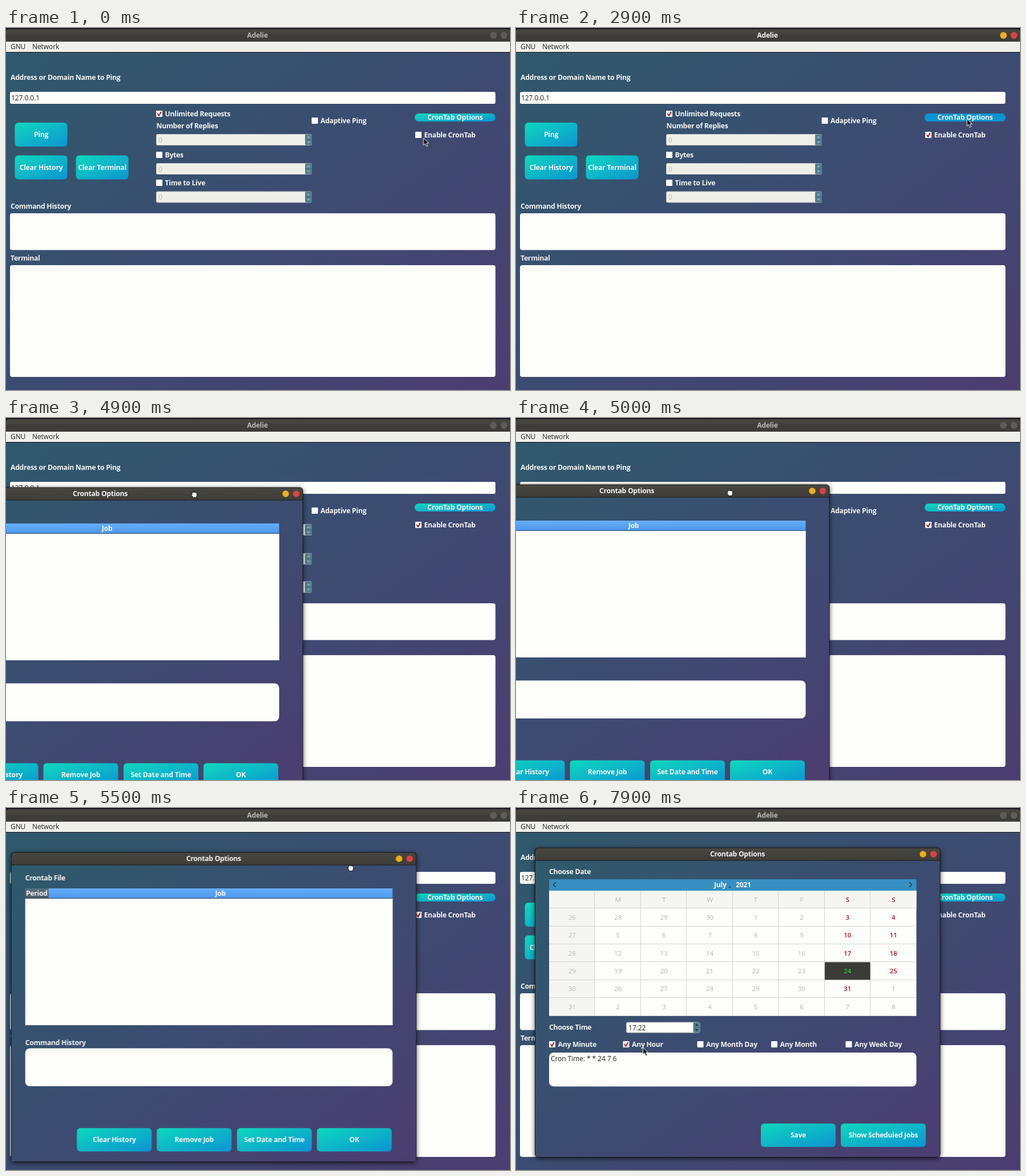
Write an HTML page that moves like this. It is 883x635 px and loops after 8 s.

```html
<!DOCTYPE html>
<html lang="en">
<head>
<meta charset="utf-8">
<title>Ping window</title>
<style>
  html, body { margin: 0; width: 100%; height: 100%; overflow: hidden; background: #3c4b70; }
  svg { display: block; width: 883px; height: 635px; }
  text { font: 700 12.2px "Open Sans", "Noto Sans", sans-serif; letter-spacing: -.27px; fill: #f3f4f2; white-space: pre; }
  .mid { text-anchor: middle; }
  .plain { font-weight: 400; font-size: 12px; letter-spacing: -.08px; fill: #222; }
  .off { fill: #bdbdb8; }
  .day { font-weight: 400; font-size: 11.5px; letter-spacing: 0; fill: #b5b5b1; }
  .weekend { font-weight: 600; fill: #b3142c; }
  .today { font-weight: 600; fill: #2fc044; }
  .idle { fill: #bab7b0; }
  .paper { fill: #fefefb; }
  .shadow { filter: drop-shadow(0 2px 4px #000a); }
</style>
</head>
<body>
<svg viewBox="0 0 883 635" id="stage"></svg>
<script>
const LOOP = 8000, STEP = 100;

// Drawing helpers
const text = (x, y, s, cls = '') => `<text x="${x}" y="${y}" class="${cls}">${s}</text>`;
const rect = (x, y, w, h, fill, r = 0, extra = '') =>
  `<rect x="${x}" y="${y}" width="${w}" height="${h}" rx="${r}" fill="${fill}" ${extra}/>`;
const paper = (x, y, w, h, r) => rect(x, y, w, h, '#fefefb', r);
const line = (d, color, width = 1) => `<path d="${d}" fill="none" stroke="${color}" stroke-width="${width}"/>`;
const dot = (x, y, r, fill) => `<circle cx="${x}" cy="${y}" r="${r}" fill="${fill}"/>`;
const group = (id, ...parts) => `<g id="${id}">${parts.join('')}</g>`;

const gradient = (id, x2, y2, ...colors) =>
  `<linearGradient id="${id}" x1="0" y1="0" x2="${x2}" y2="${y2}">${colors.map((c, i) =>
    `<stop offset="${i / (colors.length - 1)}" stop-color="${c}"/>`).join('')}</linearGradient>`;

const button = (x, y, w, h, label, overlay = '', r = 6) =>
  rect(x, y, w, h, 'url(#cool)', r) + overlay + text(x + w / 2, y + h / 2 + 4.3, label, 'mid');

const tick = (x, y) => line(`M${x + 2.4} ${y + 5}l2.6 3.8l3.8 -7`, '#b8101a', 1.8);
const check = (x, y, label, mark = '') =>
  paper(x, y, 11, 11, 1) + mark + text(x + 15.5, y + 10, label);

function spin(x, y, w, h, value, enabled) {
  const cx = x + w - 6, cy = y + h / 2, ink = enabled ? '#24323a' : '#8fadb6';
  return rect(x + .5, y + .5, w - 1, h - 1, enabled ? '#fefefb' : '#efefea', 2, 'stroke="#c9cac5"') +
    rect(x + w - 12, y + .5, 12, h - 1, '#557f90', 2) +
    line(`M${x + w - 12} ${cy}h12`, '#426878') +
    `<path d="M${cx - 3} ${cy - 3}l3 -3.5l3 3.5zM${cx - 3} ${cy + 3}l3 3.5l3 -3.5z" fill="${ink}"/>` +
    text(x + 4, cy + 4.8, value, enabled ? 'plain' : 'plain off');
}

function calendar() {
  const left = 58, top = 145, cw = 80.44, rh = 31.36;
  const cell = (col, row, s, cls) =>
    text(left + (col + .5) * cw, top + (row + .5) * rh + 4, s, 'mid day ' + cls);
  let out = rect(left, 125, 643.5, 20, '#388fc1') + paper(left, top, 643.5, 219.5) +
    rect(left, top, 643.5, rh, '#f5f5f2') + rect(left, top, cw, 219.5, '#f5f5f2') +
    rect(left + 6 * cw, top + 4 * rh, cw, rh, '#3c3b37');
  let grid = '';
  for (let i = 1; i < 8; i++) {
    grid += `M${left} ${Math.round(top + i * rh) - .5}h643.5M${Math.round(left + i * cw) - .5} ${top}v219.5`;
  }
  out += line(grid, '#d4d4d0') + rect(left + 6 * cw + .5, top + 4 * rh + .5, cw - 1, rh - 1, '#3c3b37');
  [...'MTWTFSS'].forEach((d, i) => out += cell(i + 1, 0, d, i > 4 ? 'weekend' : ''));
  for (let row = 1; row < 7; row++) {
    out += cell(0, row, 25 + row, '');
    for (let col = 1; col < 8; col++) {
      const date = new Date(2021, 5, 20 + row * 7 + col), day = date.getDate();
      const july = date.getMonth() === 6;
      out += cell(col, row, day, july && day === 24 ? 'today' : july && col > 5 ? 'weekend' : '');
    }
  }
  return out + text(347, 139, 'July') + text(385, 139, '2021') +
    '<path d="M372.500 138h4l-2 2.500z" fill="#1d3c50"/>' +
    line('M70 130l-4.500 4.500l4.500 4.500M689 130l4.500 4.500l-4.500 4.500', '#24404f', 1.6);
}

const defs = `<defs>
  ${gradient('sky', 1, 1, '#2f5a6c', '#3c4c71', '#4c3d70')}
  ${gradient('cool', 1, 1, '#0fd8be', '#0c94d2')}
  ${gradient('coolHover', 1, 1, '#0c94d2', '#0fd8be')}
  ${gradient('bar', 0, 1, '#484740', '#3b3a36')}
  ${gradient('job', 0, 1, '#66aefa', '#4f98ea')}
  ${gradient('period', 0, 1, '#5c6f7b', '#4a5a66')}
</defs>`;

const mainWindow =
  rect(0, 0, 883, 635, 'url(#sky)') + rect(0, 0, 883, 4, '#191420') +
  rect(0, 2, 883, 22, 'url(#bar)', 5) + rect(0, 12, 883, 12, '#3d3c38') +
  group('idle', text(440.5, 17, 'Adelie', 'mid idle'), dot(854, 13, 6, '#5e5c58'), dot(872.5, 13, 6, '#5e5c58')) +
  group('active', text(440.5, 17, 'Adelie', 'mid'), dot(854, 13, 6, '#ecae1c'), dot(872.5, 13, 6, '#dc4144')) +
  rect(0, 24, 883, 18, '#f0f0eb') + rect(0, 42, 883, 1, '#17181c') +
  text(8, 37, 'GNU', 'plain') + text(46, 37, 'Network', 'plain') +
  text(8, 91, 'Address or Domain Name to Ping') +
  paper(7, 112, 850.5, 21, 3) + text(9, 127, '127.0.0.1', 'plain') +
  button(15.5, 166, 92, 42, 'Ping') +
  button(15.5, 223.5, 92, 42, 'Clear History') +
  button(122.5, 223.5, 92, 42, 'Clear Terminal') +
  check(263, 145, 'Unlimited Requests', tick(263, 145)) +
  text(263.5, 176, 'Number of Replies') + spin(263, 186, 273, 20, '0') +
  check(263, 217, 'Bytes') + spin(263, 237, 273, 20, '0') +
  check(263, 266, 'Time to Live') + spin(263, 286.5, 273, 20, '0') +
  check(535.5, 157, 'Adaptive Ping') +
  button(716, 150, 141.5, 14, 'CronTab Options',
    rect(716, 150, 141.5, 14, 'url(#coolHover)', 7, 'id="cronHover"') +
    rect(716, 150, 141.5, 14, '#0c94d0', 7, 'id="cronPress"'), 7) +
  check(717, 182, 'Enable CronTab', group('cronTick', tick(717, 182))) +
  text(8, 317, 'Command History') + paper(7, 325, 850.5, 64.5, 4) +
  text(8, 408, 'Terminal') + paper(7, 416, 850.5, 196, 4);

const jobsPage =
  group('jobs',
    group('jobsHead', text(58, 119, 'Crontab File'),
      rect(58, 133, 41, 17, 'url(#period)'), rect(99, 133, 602.5, 17, 'url(#job)'),
      text(78, 146, 'Period', 'mid'), text(400, 146, 'Job', 'mid')),
    paper(58, 150.5, 643.5, 222.5),
    line('M58 150.500h643.500', '#30455f'), line('M58 365.500h604', '#2e3358', 1.5),
    group('jobsBody', paper(58, 151, 643.5, 222)),
    text(58, 408, 'Command History'), paper(58, 413.5, 643.5, 66.5, 8),
    button(148.5, 553.5, 131, 41, 'Clear History'),
    button(288.5, 553.5, 131, 41, 'Remove Job'),
    button(429, 553.5, 131, 41, 'Set Date and Time',
      rect(429, 553.5, 131, 41, 'url(#coolHover)', 6, 'id="dateHover"')),
    button(569, 553.5, 131, 41, 'OK'));

const schedulePage =
  group('calendar', text(58, 116, 'Choose Date'), calendar()) +
  group('schedule',
    text(58, 389, 'Choose Time'), spin(193, 375.5, 129.5, 19, '17:22', true),
    check(58, 409, 'Any Minute', group('minuteTick', tick(58, 409))),
    check(187.5, 409, 'Any Hour', group('hourTick', tick(187.5, 409))),
    check(317.5, 409, 'Any Month Day'), check(447, 409, 'Any Month'), check(577.5, 409, 'Any Week Day'),
    paper(58, 429, 643.5, 59.5, 8),
    group('cronFixed', text(61, 444, 'Cron Time: 22 17 24 7 6', 'plain')),
    group('cronMinute', text(61, 444, 'Cron Time: * 17 24 7 6', 'plain')),
    group('cronBoth', text(61, 444, 'Cron Time: * * 24 7 6', 'plain')),
    button(429, 553.5, 131, 41, 'Save'),
    button(569, 553.5, 149, 41, 'Show Scheduled Jobs'));

const dialog = group('dialog',
  rect(33, 69.5, 710.5, 543.5, '#17181c', 6, 'class="shadow"'),
  rect(34, 70.5, 708.5, 28, 'url(#bar)', 5), rect(34, 92, 708.5, 520, 'url(#sky)'),
  rect(34, 91.5, 708.5, 1, '#17181c'),
  text(388, 85, 'Crontab Options', 'mid'),
  dot(713, 81, 5.8, '#ecae1c'), dot(731.5, 81, 5.8, '#dc4144'),
  jobsPage, schedulePage);

const cursor = group('cursor',
  `<path id="arrow" d="M0 0v12.500l2.900 -2.700l2.200 5l2.300 -1l-2.200 -4.800h4z" fill="#111" stroke="#f4f4f4"/>`,
  `<path id="fist" d="M-4.500 -2q0 -2.500 2 -2.500q1 -1 2.200 0q1.200 -1 2.400 0.300q2.400 -.5 2.400 2v3.200l-1.500 3.500h-5l-3.500 -4.500q0 -2 1.800 -.8z" fill="#fff" stroke="#111"/>`);

document.getElementById('stage').innerHTML = defs + mainWindow + dialog + cursor;

// Timeline helpers, all times in ms
function play(id, frames) {
  frames.push({ ...frames.at(-1), at: LOOP });
  document.getElementById(id).animate(
    frames.map(({ at, easing = 'step-end', ...style }) => ({ offset: at / LOOP, easing, ...style })),
    { duration: LOOP, iterations: Infinity });
}

function show(id, ...spans) {
  const frames = spans[0][0] > 0 ? [{ at: 0, opacity: 0 }] : [];
  for (const [from, to] of spans) {
    frames.push({ at: from, opacity: 1 });
    if (to < LOOP) frames.push({ at: to, opacity: 0 });
  }
  play(id, frames);
}

// Moves in jumps of STEP between the points; a point marked 'hold' rests until the next one.
function move(id, points) {
  play(id, points.map(([at, x, y, hold], i) => {
    const next = points[i + 1];
    const easing = hold || !next ? 'step-end' : `steps(${(next[0] - at) / STEP}, end)`;
    return { at, easing, transform: `translate(${x}px, ${y}px)` };
  }));
}

show('idle', [0, 400], [4700, LOOP]);
show('active', [400, 4700]);
show('cronTick', [500, LOOP]);
show('cronHover', [1000, 3400]);
show('cronPress', [2900, 3000]);
show('dialog', [4900, LOOP]);
show('dateHover', [6400, 6700]);
show('jobsHead', [0, 6600]);
show('jobsBody', [0, 6600]);
show('jobs', [0, 6700]);
show('calendar', [6600, LOOP]);
show('schedule', [6700, LOOP]);
show('minuteTick', [7000, LOOP]);
show('hourTick', [7200, LOOP]);
show('cronFixed', [6700, 7000]);
show('cronMinute', [7000, 7200]);
show('cronBoth', [7200, LOOP]);
show('arrow', [0, 4000], [5900, LOOP]);
show('fist', [4900, 5900]);

move('dialog', [
  [0, -223, 52, 'hold'], [4900, -223, 52], [5000, -194, 47], [5300, -73, 24], [5600, 0, 0]]);

move('cursor', [
  [0, 731.5, 193, 'hold'], [100, 735, 190.5, 'hold'],
  [800, 742, 186], [1100, 802, 154, 'hold'],
  [2200, 796, 156], [2300, 790, 159.5, 'hold'],
  [3400, 796, 162], [3500, 801, 165, 'hold'],
  [3800, 520, 150], [4000, 12, 121, 'hold'],
  [4900, 330, 135], [5000, 375, 132], [5300, 551, 121], [5700, 657, 91, 'hold'],
  [5900, 652, 435.5, 'hold'],
  [6100, 700, 550], [6200, 729, 615], [6400, 536, 585, 'hold'],
  [6700, 480, 560], [7000, 60, 414], [7200, 192, 414], [7400, 309, 354], [7900, 222.5, 420]]);
</script>
</body>
</html>
```
